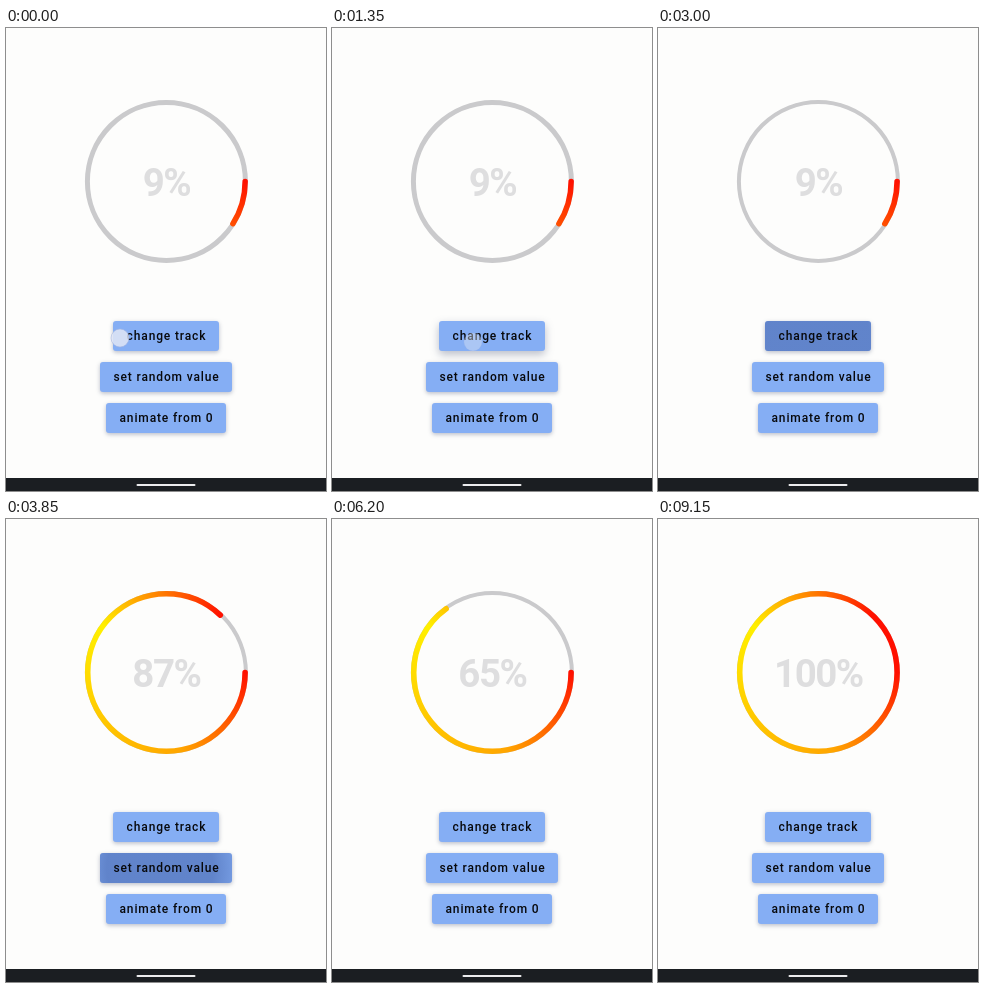
These frames come from a looping animation (320x463 px, 9.8 s). An HTML page with a canvas:

```html
<!DOCTYPE html>
<html lang="en">
<head>
<meta charset="utf-8">
<title>Circular progress</title>
<style>
html, body { margin: 0; width: 100%; height: 100%; overflow: hidden; background: #fdfdfc; }
canvas { display: block; width: 320px; height: 463px; }
</style>
</head>
<body>
<canvas id="stage"></canvas>
<script>
const W = 320, H = 463, LOOP = 9800;
const CX = 160.4, CY = 153.5, OUTER = 81.5;
const FONT = 'Roboto, "Open Sans", sans-serif';

const canvas = document.getElementById('stage');
const ctx = canvas.getContext('2d');
const dpr = window.devicePixelRatio || 1;
canvas.width = W * dpr;
canvas.height = H * dpr;

const buttons = [
  { label: 'change track', y: 293, w: 106 },
  { label: 'set random value', y: 334, w: 132 },
  { label: 'animate from 0', y: 375, w: 120 }
];

const taps = [
  { at: 1950, button: 0, x: 144, y: 312 },
  { at: 2800, button: 0, x: 144, y: 312 },
  { at: 3700, button: 1, x: 154, y: 350 },
  { at: 4850, button: 1, x: 154, y: 350 },
  { at: 6480, button: 2, x: 156, y: 391 }
];

const clamp = v => Math.max(0, Math.min(1, v));
const ramp = (t, from, to) => clamp((t - from) / (to - from));
const mix = (a, b, k) => a + (b - a) * k;

const sweep = ctx.createConicGradient(0, CX, CY);
sweep.addColorStop(0, '#ff1000');
sweep.addColorStop(0.22, '#ffa500');
sweep.addColorStop(0.6, '#fff000');
sweep.addColorStop(0.87, '#ff1000');
sweep.addColorStop(1, '#ff1000');

function progressAt(t) {
  if (t < 3700) return 0.09;
  if (t < 4850) return 0.87;
  if (t < 6480) return 0.65;
  const left = 1 - ramp(t, 6480, 8480);
  return 1 - left * left;
}

function widthsAt(t) {
  if (t < 1950) return { track: 5, bar: 5.5 };
  if (t < 2800) return { track: 2.8, bar: 4 };
  return { track: 4, bar: 5.6 };
}

// Strokes of every width share the same outer edge.
function arc(to, width, style) {
  ctx.beginPath();
  ctx.arc(CX, CY, OUTER - width / 2, 0, to * Math.PI * 2);
  ctx.lineWidth = width;
  ctx.lineCap = 'round';
  ctx.strokeStyle = style;
  ctx.stroke();
}

function drawRing(t) {
  const value = progressAt(t);
  const widths = widthsAt(t);
  arc(1, widths.track, '#cacacc');
  if (value > 0) arc(value, widths.bar, sweep);

  ctx.font = '700 38.5px ' + FONT;
  ctx.letterSpacing = '-1.5px';
  ctx.fillStyle = '#dededf';
  ctx.fillText(Math.floor(value * 100 + 1e-6) + '%', CX, 168.2);
}

function drawRipple(tap, t) {
  const age = t - tap.at;
  if (age < 0 || age > 480) return;
  const grow = 1 - Math.pow(1 - clamp(age / 225), 2);
  const alpha = 0.44 * clamp(age / 75) * (1 - ramp(age, 240, 480));
  const radius = mix(20, 100, grow);
  const wave = ctx.createRadialGradient(tap.x, tap.y, 0, tap.x, tap.y, radius);
  const ink = a => `rgba(50,78,150,${a})`;
  wave.addColorStop(0, ink(alpha));
  wave.addColorStop(mix(0.3, 0.7, grow * grow * grow), ink(alpha));
  wave.addColorStop(1, ink(0));
  ctx.fillStyle = wave;
  ctx.fillRect(0, 280, W, 140);
}

function drawButton(button, index, t) {
  const lift = index === 0 ? ramp(t, 1200, 1320) * (1 - ramp(t, 1950, 2100)) : 0;
  ctx.beginPath();
  ctx.roundRect(W / 2 - button.w / 2, button.y, button.w, 30, 3);

  ctx.save();
  ctx.shadowColor = 'rgba(85,95,125,0.4)';
  ctx.shadowBlur = mix(4, 8, lift) * dpr;
  ctx.shadowOffsetY = mix(1.6, 3.4, lift) * dpr;
  ctx.fillStyle = '#85aef4';
  ctx.fill();
  ctx.restore();

  ctx.save();
  ctx.clip();
  taps.filter(tap => tap.button === index).forEach(tap => drawRipple(tap, t));
  ctx.restore();

  ctx.font = '500 12px ' + FONT;
  ctx.letterSpacing = '0.86px';
  ctx.fillStyle = '#08090c';
  ctx.fillText(button.label, W / 2 + 0.5, button.y + 19.2);
}

function drawPointer(t) {
  if (t >= 1950) return;
  const k = ramp(t, 0, 1350);
  const x = mix(114, 141, k), y = mix(310, 314, k);
  ctx.beginPath();
  ctx.arc(x, y, 9, 0, Math.PI * 2);
  ctx.fillStyle = `rgba(224,230,244,${mix(0.85, 0.42, k)})`;
  ctx.fill();
  ctx.lineWidth = 0.8;
  ctx.strokeStyle = `rgba(165,182,225,${mix(0.7, 0.25, k)})`;
  ctx.stroke();
}

function drawNavBar() {
  ctx.fillStyle = '#1b1e22';
  ctx.fillRect(0, 450, W, 13);
  ctx.fillStyle = '#ececee';
  ctx.beginPath();
  ctx.roundRect(130.5, 456, 59, 2, 1);
  ctx.fill();
}

function draw(t) {
  ctx.setTransform(dpr, 0, 0, dpr, 0, 0);
  ctx.fillStyle = '#fdfdfc';
  ctx.fillRect(0, 0, W, H);
  ctx.textAlign = 'center';
  drawRing(t);
  buttons.forEach((button, i) => drawButton(button, i, t));
  drawPointer(t);
  drawNavBar();
}

const start = performance.now();
function tick() {
  draw((performance.now() - start) % LOOP);
  requestAnimationFrame(tick);
}
tick();
</script>
</body>
</html>
```
